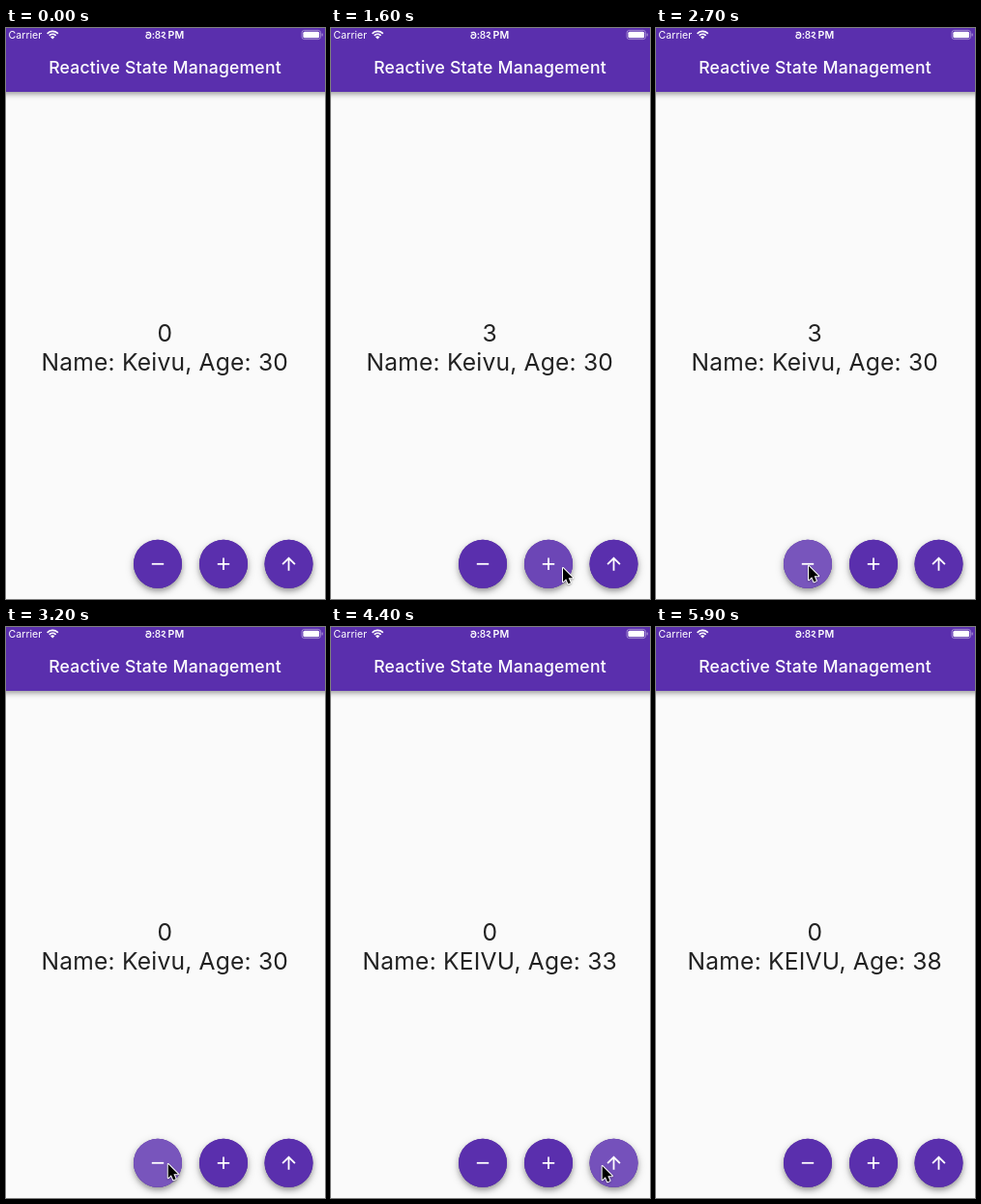
Animation of 330 by 590 pixels, one loop 8000 ms. Source, as an HTML page with a canvas:

```html
<!DOCTYPE html>
<html lang="en">
<head>
<meta charset="utf-8">
<title>Reactive State Management</title>
<style>
  html, body { margin: 0; width: 100%; height: 100%; overflow: hidden; background: #fafafa; }
  canvas { display: block; }
</style>
</head>
<body>
<canvas id="stage" width="330" height="590"></canvas>
<script>
const ctx = document.getElementById('stage').getContext('2d');
const LOOP = 8000, STEP = 100, TAP = 200;
const PURPLE = '#5a2fad', INK = '#222222';

const buttons = {
  minus: { x: 157, icon: 'M-6.2 0H6.2', first: 2400, taps: 5, glow: 0.18 },
  plus: { x: 225, icon: 'M-6.2 0H6.2M0 -6.2V6.2', first: 1200, taps: 5, glow: 0.11 },
  up: { x: 292.5, icon: 'M0 7V-5.8M-6.4 0.4L0 -6L6.4 0.4', first: 3900, taps: 8, glow: 0.165 }
};

// Cursor tip: time, x, y
const cursorPath = [
  [500, 298, 570], [700, 270, 564], [1000, 240, 558], [2000, 240, 558],
  [2300, 160, 556], [2700, 158, 556], [3000, 167, 555], [3300, 168, 555],
  [3800, 280, 557], [4000, 281, 557], [5000, 280, 557], [5300, 281, 557],
  [5400, 316, 572], [5500, 340, 592]
];

const clamp = v => Math.max(0, Math.min(1, v));

function tapsDone({ first, taps }, t) {
  return t < first ? 0 : Math.min(taps, Math.floor((t - first) / TAP) + 1);
}

function glowAt({ first, taps, glow }, t) {
  const last = first + (taps - 1) * TAP;
  return glow * clamp((t - first + 100) / 100) * clamp(1 - (t - last) / 300);
}

function cursorAt(t) {
  const i = cursorPath.findIndex(p => p[0] > t);
  if (i < 1) return null;
  const [t0, x0, y0] = cursorPath[i - 1], [t1, x1, y1] = cursorPath[i];
  const k = (t - t0) / (t1 - t0), e = k * k * (3 - 2 * k);
  return [x0 + (x1 - x0) * e, y0 + (y1 - y0) * e];
}

function text(str, x, y, size, { weight = 400, color = '#fff', align = 'center', spacing = 0 } = {}) {
  ctx.font = `${weight} ${size}px Inter, sans-serif`;
  ctx.letterSpacing = spacing + 'px';
  ctx.textAlign = align;
  ctx.fillStyle = color;
  ctx.fillText(str, x, y);
}

function shadow(alpha, blur, dy) {
  ctx.shadowColor = `rgba(0,0,0,${alpha})`;
  ctx.shadowBlur = blur;
  ctx.shadowOffsetY = dy;
}

function disc(x, y, r, color) {
  ctx.beginPath();
  ctx.arc(x, y, r, 0, Math.PI * 2);
  ctx.fillStyle = color;
  ctx.fill();
}

function strokePath(d, width) {
  ctx.strokeStyle = '#fff';
  ctx.lineWidth = width;
  ctx.stroke(new Path2D(d));
}

function drawWifi() {
  ctx.strokeStyle = '#fff';
  ctx.lineWidth = 1.7;
  for (const r of [4.6, 7.6]) {
    ctx.beginPath();
    ctx.arc(48.2, 11, r, -Math.PI * 0.76, -Math.PI * 0.24);
    ctx.stroke();
  }
  ctx.beginPath();
  ctx.moveTo(48.2, 11.4);
  ctx.arc(48.2, 11.4, 3, -Math.PI * 0.76, -Math.PI * 0.24);
  ctx.fillStyle = '#fff';
  ctx.fill();
}

function drawBattery() {
  ctx.strokeStyle = 'rgba(255,255,255,.45)';
  ctx.lineWidth = 0.9;
  ctx.beginPath();
  ctx.roundRect(306, 2.4, 19.5, 9.2, 2.6);
  ctx.stroke();
  ctx.fillStyle = '#fff';
  ctx.beginPath();
  ctx.roundRect(307.4, 3.8, 16.7, 6.4, 1.5);
  ctx.fill();
  ctx.fillStyle = 'rgba(255,255,255,.5)';
  ctx.fillRect(326.6, 5.6, 1.1, 2.8);
}

// Bengali numerals are stroked so they do not depend on font coverage.
function drawClock() {
  strokePath('M144.8 5.1Q149.6 3 149.8 7.4Q149.8 10.6 147 10.6A2 2 0 1 1 148.6 7.5', 1.25);
  text(':', 152.4, 10.7, 10.6, { weight: 600 });
  text('8', 157, 11, 10.2, { weight: 500 });
  strokePath('M161 5.6Q162.2 3.7 163.8 4.6Q165.4 6.5 161.4 8.6L165.2 10.8', 1.25);
  text('PM', 167.6, 11, 10.6, { weight: 600, align: 'left' });
}

function drawHeader() {
  ctx.save();
  shadow(0.42, 6, 2);
  ctx.fillStyle = PURPLE;
  ctx.fillRect(-10, -10, 350, 76);
  ctx.restore();
  text('Carrier', 2.6, 11, 10.6, { align: 'left' });
  drawWifi();
  drawClock();
  drawBattery();
  text('Reactive State Management', 164.5, 47, 17.6, { weight: 500, spacing: 0.2 });
}

function drawButton(button, t) {
  const y = 553.8, r = 25;
  ctx.save();
  shadow(0.22, 10, 3);
  disc(button.x, y, r, PURPLE);
  shadow(0.24, 5, 3);
  disc(button.x, y, r, PURPLE);
  ctx.restore();
  disc(button.x, y, r, `rgba(255,255,255,${glowAt(button, t)})`);
  ctx.save();
  ctx.translate(button.x, y);
  strokePath(button.icon, 1.8);
  ctx.restore();
}

function drawCursor(x, y) {
  ctx.save();
  ctx.translate(x, y);
  const arrow = new Path2D('M0 0V14.2L3.2 11.2L5.4 16.3L7.9 15.2L5.7 10.2H10.2Z');
  ctx.lineJoin = 'round';
  ctx.lineWidth = 2;
  ctx.strokeStyle = '#fff';
  shadow(0.3, 2, 1);
  ctx.stroke(arrow);
  ctx.shadowColor = 'transparent';
  ctx.fillStyle = '#000';
  ctx.fill(arrow);
  ctx.restore();
}

function draw(t) {
  ctx.fillStyle = '#fafafa';
  ctx.fillRect(0, 0, 330, 590);
  drawHeader();

  const count = tapsDone(buttons.plus, t) - tapsDone(buttons.minus, t);
  const ups = tapsDone(buttons.up, t);
  const body = { color: INK, spacing: 0.2 };
  text(String(count), 164.3, 324.4, 24.6, body);
  text(`Name: ${ups ? 'KEIVU' : 'Keivu'}, Age: ${30 + ups}`, 164.3, 353.8, 24.6, body);

  Object.values(buttons).forEach(button => drawButton(button, t));
  const tip = cursorAt(t);
  if (tip) drawCursor(...tip);
}

const start = performance.now();
function frame() {
  let t = Math.floor(((performance.now() - start) % LOOP) / STEP) * STEP;
  if (t > 5500 && t < 5900) t = 5500;
  draw(t);
  requestAnimationFrame(frame);
}
frame();
</script>
</body>
</html>
```
